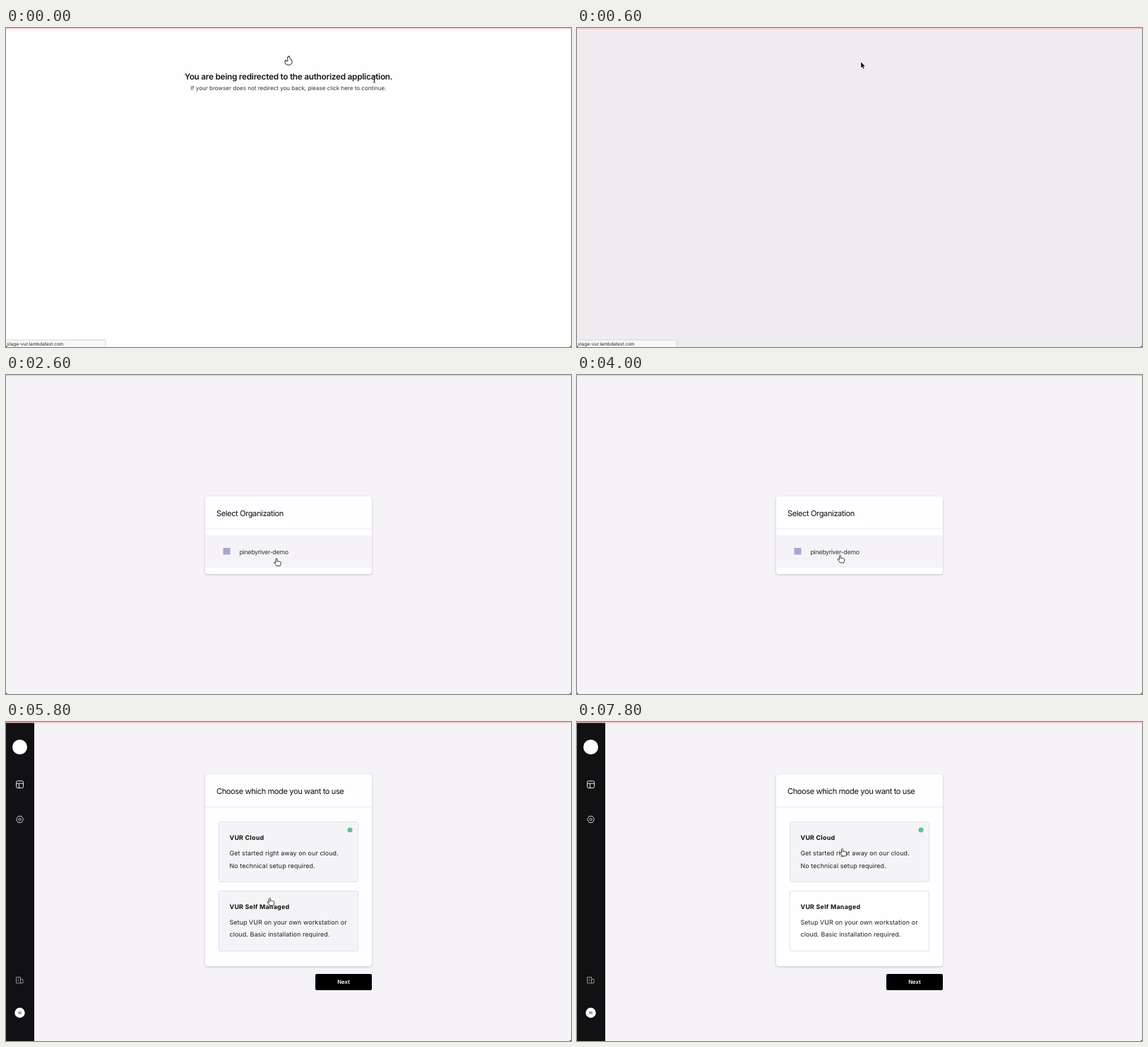
Recreate the animation shown at these times as an HTML page. Size 800 px wide and 452 px high, loop 8000 ms.

```html
<!DOCTYPE html>
<html lang="en">
<head>
<meta charset="utf-8">
<title>Sign-in walkthrough</title>
<style>
  html, body { margin: 0; width: 100%; height: 100%; overflow: hidden; background: #f5f3f7; }
  svg { display: block; width: 100vw; height: 100vh; font-family: Inter, sans-serif; text-rendering: geometricPrecision; }
  .title { font-size: 11.1px; letter-spacing: -.4px; fill: #111; }
  .headline { font-size: 11.8px; font-weight: 600; letter-spacing: -.26px; fill: #18181b; }
  .note { font-size: 8.04px; fill: #33333b; }
  .row { font-size: 8.9px; letter-spacing: -.34px; fill: #333; }
  .name { font-size: 8.9px; font-weight: 700; letter-spacing: .25px; fill: #111; }
  .body { font-size: 8.9px; letter-spacing: .1px; fill: #1c1c1f; }
  .button { font-size: 7.8px; font-weight: 600; fill: #fff; }
  .status { font-size: 6.5px; fill: #222; }
  .mid { text-anchor: middle; }
  .card { fill: #fefdff; filter: drop-shadow(0 1px 1.5px rgba(0, 0, 0, .2)); }
  .rule { stroke: #e9e8ec; }
  .option { stroke: #e2e1e5; fill: #f4f3f6; }
  .icon { fill: none; stroke: #e8e8ea; }
</style>
</head>
<body>
<svg viewBox="0 0 800 452" preserveAspectRatio="none">
  <rect id="backdrop" width="800" height="452"/>

  <g id="redirect">
    <path transform="translate(392.9 38.9) scale(.89)" d="M8.9 1C9.1 3.5 10.400 4.900 11.700 6.100 12.900 7.300 13.800 8.300 13.800 10c0 3-2.600 5.200-5.800 5.200S2.200 13 2.200 10c0-1 .400-2 1-2.600C4 9.500 6 9.200 6.600 8.400 7.200 7.700 7 6.900 6.600 6.200 5.400 3.800 7 1.800 8.900 1z" fill="none" stroke="#333" stroke-width="1.200" stroke-linejoin="round"/>
    <text class="headline mid" x="400" y="72.5">You are being redirected to the authorized application.</text>
    <text class="note mid" x="400" y="88.3">If your browser does not redirect you back, please click here to continue.</text>
  </g>

  <g id="status">
    <rect x="-1" y="442" width="142" height="11" rx="1" fill="#f8f8f9" stroke="#d3d3d6"/>
    <text class="status" x="1" y="449.8">stage-vur.lambdatest.com</text>
  </g>

  <g id="organization">
    <rect class="card" x="282" y="172" width="236" height="110" rx="4"/>
    <path class="rule" d="M282 218h236"/>
    <rect id="rowHover" x="282.5" y="227" width="235" height="46" fill="#f5f3f7"/>
    <circle cx="312.5" cy="250" r="11.5" fill="#f5f3f7"/>
    <rect id="avatar" x="307.5" y="245" width="10" height="9.5" fill="#aaa4d2"/>
    <text class="title" x="298" y="199.5">Select Organization</text>
    <text class="row" x="330.5" y="253.6">pinebyriver-demo</text>
  </g>

  <g id="mode">
    <rect width="40" height="452" fill="#111013"/>
    <circle cx="19.5" cy="35.5" r="10.5" fill="#fff"/>
    <g class="icon">
      <rect x="14.5" y="83.5" width="10" height="10" rx="2"/>
      <path d="M14.5 87h10M18.5 87v6.5"/>
      <path d="M17 133.5h5l2.5 4.5-2.5 4.5h-5l-2.5-4.5z" stroke="#c5c5c9" stroke-linejoin="round"/>
      <circle cx="19.5" cy="138" r="1.7" stroke="#c5c5c9"/>
      <path d="M14.5 361.5h6v8.5h-6zM20.5 364.5H24v5.5h-4M16.5 364h2M16.5 366.5h2" stroke="#9c9ca0" stroke-width=".9"/>
    </g>
    <circle cx="19.5" cy="412" r="7.2" fill="#fff"/>
    <rect x="17" y="410" width="5" height="4" fill="#aaa4d2"/>

    <rect class="card" x="282" y="74" width="236" height="272" rx="4"/>
    <path class="rule" d="M282 120.5h236"/>
    <text class="title" x="298" y="101.7">Choose which mode you want to use</text>

    <rect class="option" x="301.5" y="141.5" width="197" height="85" rx="2"/>
    <circle cx="487" cy="153" r="3.5" fill="#5cc19a"/>
    <text class="name" x="316.5" y="167">VUR Cloud</text>
    <text class="body" x="316.5" y="188.7">Get started right away on our cloud.</text>
    <text class="body" x="316.5" y="206.5">No technical setup required.</text>

    <rect id="selfManaged" class="option" x="301.5" y="239.5" width="197" height="85" rx="2"/>
    <text class="name" x="316.5" y="264.7">VUR Self Managed</text>
    <text class="body" x="316.5" y="286.5">Setup VUR on your own workstation or</text>
    <text class="body" x="316.5" y="304.2">cloud. Basic installation required.</text>

    <rect x="438" y="357" width="80" height="23" rx="2"/>
    <text class="button mid" x="478" y="371.3">Next</text>
  </g>

  <rect width="800" height="1.3" fill="#f4bfc4"/>
  <path d="M0 449.5V452h2.5Q.3 451.7 0 449.5M800 449.5V452h-2.5q2.2-.3 2.5-2.5" fill="#222"/>

  <g id="cursor">
    <path id="beam" d="M-1.8-4.5Q0-4.5 0-3V3Q0 4.5-1.8 4.5M1.8-4.5Q0-4.5 0-3V3Q0 4.5 1.8 4.5M-1.2 1h2.4" fill="none" stroke="#222" stroke-width=".8"/>
    <path id="arrow" d="M0 0v8.7l2-1.8 1.4 3.2 1.5-.7-1.4-3h2.7z" stroke="#fff" stroke-width=".5"/>
    <path id="hand" d="M-1 1a1 1 0 0 1 2 0v3.2l1.2-.4.9.5 1-.2.8.6 1 .1.4.8v2l-1.2 2.9h-5l-1.5-2.2-1.9-2.3c-.3-1 .6-1.4 1.3-.8l1 .9z" fill="#fff" stroke="#222" stroke-width=".9" stroke-linejoin="round"/>
  </g>
</svg>

<script>
const DURATION = 8000, STEP = 200;
const $ = id => document.getElementById(id);
const show = (id, on) => { $(id).style.display = on ? "" : "none"; };

// Pointer path: time, x, y
const path = [
  [0, 521.5, 73], [200, 465, 75], [400, 405, 75], [600, 402, 48], [1200, 411.5, 172],
  [1400, 411, 178], [2000, 396, 234], [2400, 385, 258], [2800, 381, 262],
  [3400, 372.5, 255.5], [5000, 372.5, 255.5], [5800, 373.5, 249.5], [6000, 373.5, 249.5],
  [7000, 443, 178], [7200, 443, 178], [7800, 375.5, 179.5]
];

function pointerAt(t) {
  const next = path.findIndex(p => p[0] > t);
  if (next < 0) return path[path.length - 1].slice(1);
  const [t0, x0, y0] = path[next - 1], [t1, x1, y1] = path[next];
  const k = (t - t0) / (t1 - t0);
  return [x0 + (x1 - x0) * k, y0 + (y1 - y0) * k];
}

function sceneAt(t) {
  return t < 600 ? "redirect" : t < 1000 ? "blank" : t < 5400 ? "organization" : "mode";
}

function draw(t) {
  const scene = sceneAt(t), [x, y] = pointerAt(t);
  for (const id of ["redirect", "organization", "mode"]) show(id, id === scene);
  $("backdrop").setAttribute("fill", { redirect: "#fefefe", blank: "#eeecef" }[scene] || "#f5f3f7");
  show("status", t < 1000);

  const overRow = scene === "organization" && y > 227;
  const overSecond = y > 239 && y < 325;
  const overFirst = y > 141 && y < 227;
  show("rowHover", overRow);
  show("avatar", t >= 1400);
  $("selfManaged").style.fill = overSecond ? "#f4f3f6" : "#fefefe";

  const shape = t < 200 ? "beam" : overRow || scene === "mode" && (overFirst || overSecond) ? "hand" : "arrow";
  for (const id of ["beam", "arrow", "hand"]) show(id, id === shape);
  $("cursor").setAttribute("transform", `translate(${x} ${y})`);
}

const start = performance.now();
function tick() {
  const t = (performance.now() - start) % DURATION;
  draw(Math.floor(t / STEP) * STEP);
  requestAnimationFrame(tick);
}
tick();
</script>
</body>
</html>
```
